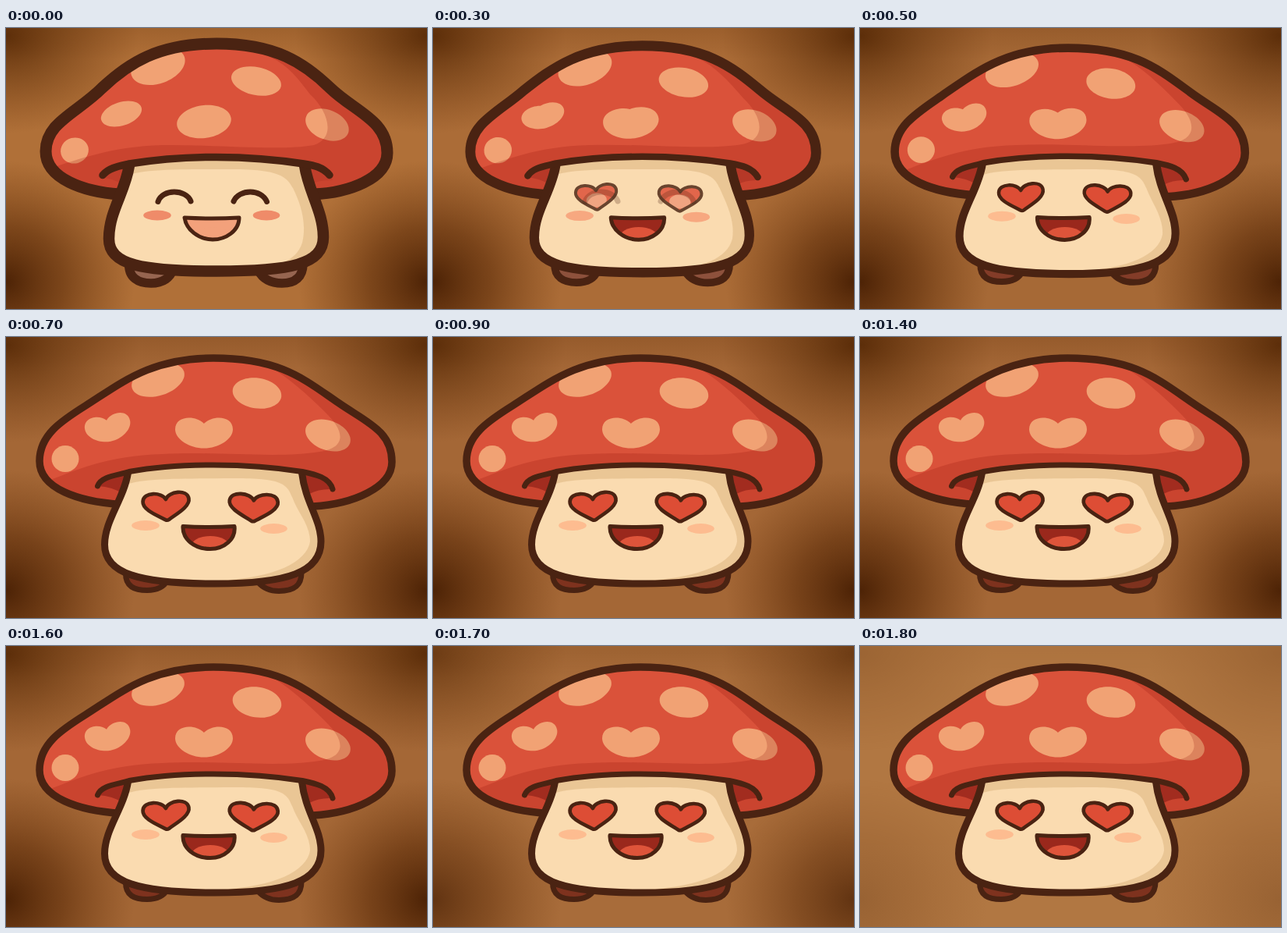
An HTML page for the animation above (1900 ms loop, 540 by 360 pixels).

```html
<!DOCTYPE html>
<html lang="en">
<head>
<meta charset="utf-8">
<title>Happy mushroom</title>
<style>
html, body { margin: 0; width: 100%; height: 100%; overflow: hidden; background: #a46933; }
svg { display: block; width: 100vw; height: 100vh; }
</style>
</head>
<body>
<svg viewBox="0 0 540 360" preserveAspectRatio="none">
  <defs>
    <radialGradient id="low"><stop offset="0" stop-color="#481f03" stop-opacity=".95"/><stop offset=".45" stop-color="#5a2a07" stop-opacity=".6"/><stop offset="1" stop-color="#6b360d" stop-opacity="0"/></radialGradient>
    <radialGradient id="high"><stop offset="0" stop-color="#552805" stop-opacity=".9"/><stop offset=".45" stop-color="#5f300a" stop-opacity=".5"/><stop offset="1" stop-color="#6b360d" stop-opacity="0"/></radialGradient>
    <linearGradient id="edge" x2="0" y2="1"><stop offset="0" stop-color="#6b360d" stop-opacity=".25"/><stop offset="1" stop-color="#6b360d" stop-opacity="0"/></linearGradient>
    <clipPath id="capClip"><path id="capMask"/></clipPath>
    <clipPath id="bodyClip"><path id="bodyMask"/></clipPath>
    <clipPath id="mouthClip"><path id="mouthMask"/></clipPath>
  </defs>
  <rect id="back" width="540" height="360"/>
  <g id="dark">
    <rect width="540" height="40" fill="url(#edge)"/>
    <ellipse cx="0" cy="325" rx="165" ry="155" fill="url(#low)"/>
    <ellipse cx="540" cy="325" rx="165" ry="155" fill="url(#low)"/>
    <ellipse cx="0" cy="10" rx="170" ry="125" fill="url(#high)"/>
    <ellipse cx="540" cy="10" rx="170" ry="125" fill="url(#high)"/>
  </g>
  <g stroke="#4a2312" fill="none" stroke-linejoin="round" stroke-linecap="round">
    <path id="footL"/>
    <path id="footR"/>
    <path id="cap" fill="#da523a" stroke="none"/>
    <g clip-path="url(#capClip)" stroke="none">
      <g id="spots" fill="#f1a274"></g>
      <path id="capShade" fill="#90160a" fill-opacity=".22" fill-rule="evenodd"/>
      <path id="rim" fill="#8e2018"/>
    </g>
    <path id="capLine" stroke-linecap="butt"/>
    <path id="body" fill="#eac695" stroke="none"/>
    <path id="bodyLight" fill="#fadbb0" stroke="none" clip-path="url(#bodyClip)"/>
    <path id="bodyLine" stroke-linecap="butt"/>
    <path id="brim"/>
    <ellipse id="cheekL" ry="6.5" stroke="none"/>
    <ellipse id="cheekR" ry="6.5" stroke="none"/>
    <path id="mouth" stroke="none"/>
    <ellipse id="tongue" rx="25" ry="14" stroke="none" clip-path="url(#mouthClip)"/>
    <path id="mouthLine"/>
    <g id="hearts"></g>
    <g id="smiles" stroke-width="7">
      <path d="M195 222.500C200 206 231 206 237 222"/>
      <path d="M292 222C299 206 328 206 334.500 222.500"/>
    </g>
  </g>
</svg>
<script>
const $ = id => document.getElementById(id);
const LOOP = 1900, STEP = 100;
const clamp = x => Math.max(0, Math.min(1, x));
const lerp = (a, b, k) => a + (b - a) * k;
const ramp = (t, from, to) => clamp((t - from) / (to - from));
const set = (id, attrs) => { for (const k in attrs) $(id).setAttribute(k, attrs[k]); };
const color = (a, b, k) => `rgb(${a.map((v, i) => Math.round(lerp(v, b[i], k)))})`;

// Blend two paths that share the same commands.
function blend([a, b], k) {
  const ends = b.match(/-?[\d.]+/g);
  let i = 0;
  return a.replace(/-?[\d.]+/g, v => lerp(+v, +ends[i++], k).toFixed(2));
}

const shapes = {
  cap: ["M146 213C100 210 51 193 51 158C51 121 91 109 123 77C157 45 195 20 270 20C346 20 383 45 416 77C447 107 489 118 489 160C489 193 440 211 394 213",
        "M146 214.500C95 211 43 195 43 159C43 126 70 108 102 88C148 59 185 27 266 27C352 27 382 54 426 84C462 109 495 120 495 160C495 193 445 214 394 217"],
  capLight: ["M40 185C90 170 130 152 200 150C270 149 350 158 395 150C425 140 412 105 390 85C375 65 362 48 340 38L270 0L30 0Z",
             "M40 190C90 170 130 152 200 150C270 146 350 156 402 147C438 142 434 120 410 97C385 72 362 52 338 38L270 0L30 0Z"],
  body: ["M158 176C153 210 132 235 132 270C132 304 175 311.500 270 311.500C365 311.500 407 303 407 268C407 235 388 210 383 176",
         "M156.500 174C151 208 126.500 235 126.500 266C126.500 303 170 316 268 316C362 316 404 301 404 262C404 234 384 212 379.500 174"],
  bodyLight: ["M150 192C165 180 230 181 280 181C350 180 360 190 368 205C378 225 386 250 380 275C372 300 345 306 320 308L120 325L120 200Z",
              "M150 192C165 180 230 182 280 181C350 180 360 186 367 205C374 225 390 240 390 262C386 288 345 309 272 312L120 325L120 200Z"],
  brim: ["M124 188.500C132 179 145 177 158 174C230 162.500 310 162.500 382 174C395 176 406 178 415 188.500",
         "M117.500 191C122 178 145 177 158 172.500C220 161 310 161 380 172.500C397 176 415 180 419 195"],
  footL: ["M158 300C156 320 170 327 186 327C202 327 211 319 214 310",
          "M153.500 302C153 320 165 324.500 181 324.500C196 324.500 203 319 207 312"],
  footR: ["M323 310C330 323 342 327 354 327C371 327 381 319 381 302",
          "M323 314C330 322 338 325.500 350 325.500C369 325.500 379 319 379 302"],
  mouth: ["M229 243Q264 245 299 243C299 260 282 271 265 271C247 271 231 258 229 243Z",
          "M227 242.500Q260 244.500 293 242.500C295 259 280 271.500 262 271.500C242 271.500 226 259 227 242.500Z"]
};

const spotShape = [
  "M0 -1C.55 -1 1 -.55 1 0C1 .55 .55 1 0 1C-.55 1 -1 .55 -1 0C-1 -.55 -.55 -1 0 -1Z",
  "M0 -.62C.3 -1.2 1 -1.15 1 -.25C1 .4 .5 1 0 1C-.5 1 -1 .4 -1 -.25C-1 -1.15 -.3 -1.2 0 -.62Z"];
// x, y, rx, ry, rotation at rest and when in love; third item marks a heart spot
const spots = [
  [[195, 49, 36, 22, -20], [195, 55, 35, 20, -18]],
  [[321, 68, 32.5, 18, 12], [322, 72, 31.5, 19.5, 8]],
  [[254, 120, 35, 21, -8], [254, 123, 37, 19.5, 0], true],
  [[148, 110, 27, 15, -18], [131, 117, 29.5, 17, -11], true],
  [[88, 157, 18, 16.5, -15], [76, 156, 17.5, 17, 0]],
  [[412, 124, 29, 19, 22], [413, 126, 30, 19, 20]]
];

const heartShape = "M0 -.45C.15 -1 .95 -1.1 1 -.4C1.05 .2 .35 .7 .08 1Q0 1.08 -.08 1C-.35 .7 -1.05 .2 -1 -.4C-.95 -1.1 -.15 -1 0 -.45Z";
const hearts = [
  [[212, 215.5, 24, 15.5, -4], [205.5, 216, 29.5, 18, -4]],
  [[316.5, 217.5, 25, 15.5, 2], [317.5, 217.5, 31, 18, 2]]
];

$("spots").innerHTML = spots.map(() => "<path/>").join("");
$("hearts").innerHTML = hearts.map(() =>
  `<g><path d="${heartShape}" fill="#dd4d35" stroke="none"/>` +
  `<ellipse cy=".3" rx=".5" ry=".55" fill="#f4ac88" stroke="none"/>` +
  `<path d="${heartShape}" vector-effect="non-scaling-stroke"/></g>`).join("");

function place(el, [a, b], k) {
  const [x, y, sx, sy, r] = a.map((v, i) => lerp(v, b[i], k));
  el.setAttribute("transform", `translate(${x} ${y}) rotate(${r}) scale(${sx} ${sy})`);
}

function draw(t) {
  const u = clamp(t / 700);
  const k = u * u * (3 - 2 * u);
  const swap = ramp(t, 0, 300);
  const glow = t >= 1800 ? 1 : t >= 1700 ? .3 : 0;
  const at = name => blend(shapes[name], k);

  const bg = [lerp(176, 164, k), lerp(112, 103, k), lerp(56, 54, k)];
  set("back", { fill: color(bg, [177, 119, 66], glow) });
  set("dark", { opacity: 1 - .75 * glow });

  const cap = at("cap"), body = at("body"), mouth = at("mouth");
  set("cap", { d: cap + "Z" });
  set("capMask", { d: cap + "Z" });
  set("capLine", { d: cap, "stroke-width": lerp(15, 9.5, k) });
  set("capShade", { d: "M0 0H540V360H0Z" + at("capLight") });
  set("rim", { d: "M118 191Q124 178 158 173L150 201Q137 192 118 191ZM419 195Q412 178 380 173L389 201Q402 194 419 195Z", opacity: .15 + .5 * k });

  const full = body + "C310 163 230 163 156 175Z";
  set("body", { d: full });
  set("bodyMask", { d: full });
  set("bodyLight", { d: at("bodyLight") });
  set("bodyLine", { d: body, "stroke-width": lerp(14.5, 9, k) });
  set("brim", { d: at("brim"), "stroke-width": lerp(9.5, 7, k) });

  for (const id of ["footL", "footR"])
    set(id, { d: at(id), fill: color([150, 101, 80], [126, 50, 30], k), "stroke-width": lerp(11.5, 7, k) });

  spots.forEach((s, i) => {
    const el = $("spots").children[i];
    el.setAttribute("d", s[2] ? blend(spotShape, k) : spotShape[0]);
    place(el, s, k);
  });

  const blush = color([239, 139, 105], [253, 188, 144], ramp(t, 0, 500));
  set("cheekL", { cx: lerp(194, 179, k), cy: lerp(240, 241.5, k), rx: 17.8, fill: blush });
  set("cheekR", { cx: lerp(334, 343.5, k), cy: lerp(240, 245.5, k), rx: 17.3, fill: blush });

  set("mouth", { d: mouth, fill: color([243, 161, 123], [154, 40, 28], swap) });
  set("mouthMask", { d: mouth });
  set("mouthLine", { d: mouth, "stroke-width": 5 });
  set("tongue", { cx: lerp(265, 262, k), cy: 269, fill: color([243, 161, 123], [222, 84, 58], swap) });

  set("smiles", { opacity: t <= 100 ? 1 : t < 300 ? .65 : t < 400 ? .25 : 0 });
  set("hearts", { opacity: t < 200 ? 0 : t < 300 ? .35 : t < 400 ? .82 : 1, "stroke-width": lerp(3.5, 4.7, k) });
  hearts.forEach((h, i) => {
    const g = $("hearts").children[i];
    place(g, h, k);
    g.children[1].setAttribute("opacity", .8 * (1 - ramp(t, 300, 400)));
  });
}

const start = performance.now();
function tick(now) {
  const t = Math.max(0, now - start) % LOOP;
  draw(Math.floor(t / STEP) * STEP);
  requestAnimationFrame(tick);
}
draw(0);
requestAnimationFrame(tick);
</script>
</body>
</html>
```
